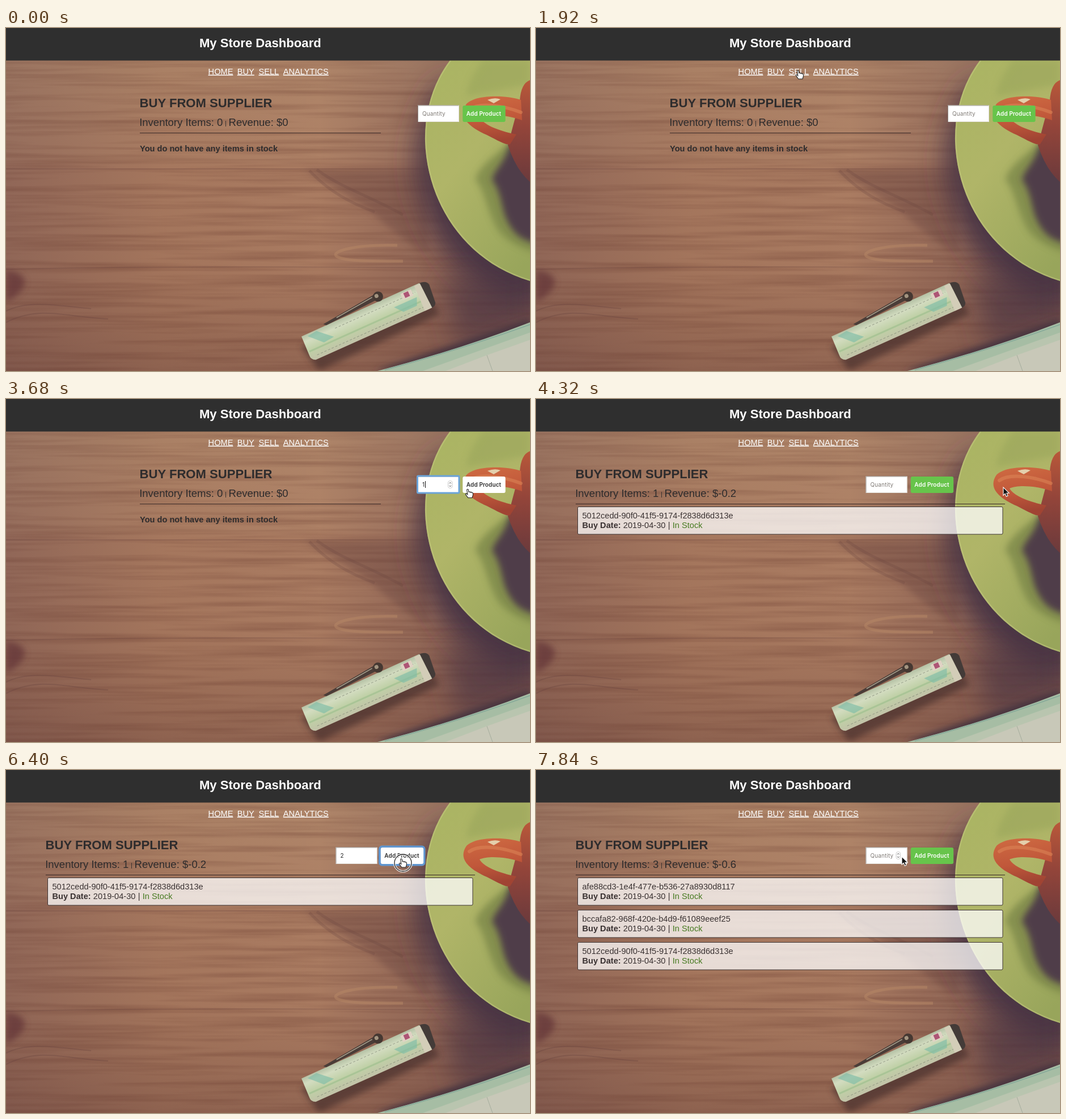
These frames come from a looping animation (924x606 px, 8000 ms). An HTML page:

```html
<!DOCTYPE html>
<html lang="en">
<head>
<meta charset="utf-8">
<title>My Store Dashboard</title>
<style>
  html, body { margin: 0; width: 100%; height: 100%; overflow: hidden; background: #93685a; }
  svg { position: absolute; left: 0; top: 0; width: 924px; height: 606px; }
  text { font: 14.6px "Liberation Sans", Arial, sans-serif; fill: #3a3232; white-space: pre; }
  .bold { font-weight: bold; }
  .title { font-size: 22.1px; fill: #fff; }
  .nav text { fill: #fff; text-decoration: underline; }
  .head text { fill: #2e2c2d; }
  .head .h2 { font-size: 22.1px; }
  .head .sum { font-size: 18.5px; }
  .head .bar { font-size: 11px; }
  .controls text { font: 10px Inter, sans-serif; letter-spacing: .12px; }
  .controls #label { font-weight: 600; }
</style>
</head>
<body>
<!-- Desk photo -->
<svg viewBox="0 0 924 606">
  <defs>
    <linearGradient id="wood">
      <stop offset="0" stop-color="#92695a"/><stop offset=".3" stop-color="#a87a60"/>
      <stop offset=".6" stop-color="#ae8065"/><stop offset="1" stop-color="#7a5550"/>
    </linearGradient>
    <linearGradient id="dusk" x2="0" y2="1">
      <stop offset="0" stop-color="#b39a78" stop-opacity=".3"/>
      <stop offset=".38" stop-color="#a98468" stop-opacity=".15"/>
      <stop offset=".41" stop-color="#80503e" stop-opacity=".08"/>
      <stop offset=".68" stop-color="#80503e" stop-opacity=".12"/>
      <stop offset="1" stop-color="#653d36" stop-opacity=".4"/>
    </linearGradient>
    <linearGradient id="lime" x2=".7" y2="1">
      <stop offset="0" stop-color="#a9b462"/><stop offset=".45" stop-color="#b0b568"/>
      <stop offset="1" stop-color="#98a55b"/>
    </linearGradient>
    <linearGradient id="red" x2=".2" y2="1">
      <stop offset="0" stop-color="#cf6b42"/><stop offset=".6" stop-color="#c0573a"/>
      <stop offset="1" stop-color="#a04433"/>
    </linearGradient>
    <linearGradient id="bowl" x2="0" y2="1">
      <stop offset="0" stop-color="#b9583a"/><stop offset=".45" stop-color="#94453a"/>
      <stop offset="1" stop-color="#6b3a3c"/>
    </linearGradient>
    <linearGradient id="mint" x2="0" y2="1">
      <stop offset="0" stop-color="#b3c0a4"/><stop offset=".25" stop-color="#d3dcc0"/>
      <stop offset=".6" stop-color="#bfd0a6"/><stop offset="1" stop-color="#c2c2a8"/>
    </linearGradient>
    <filter id="grain" x="0" y="0" width="1" height="1" color-interpolation-filters="sRGB">
      <feTurbulence type="fractalNoise" baseFrequency=".003 .1" numOctaves="3" seed="8"/>
      <feColorMatrix values="0 0 0 0 .38  0 0 0 0 .2  0 0 0 0 .16  2.4 0 0 0 -1"/>
    </filter>
    <filter id="soft" x="-50%" y="-50%" width="200%" height="200%"><feGaussianBlur stdDeviation="24"/></filter>
    <filter id="blur" x="-50%" y="-50%" width="200%" height="200%"><feGaussianBlur stdDeviation="6"/></filter>
    <path id="rim" d="M783 57C752 98 738 148 739 200C742 305 806 412 924 447"/>
    <path id="plate" d="M783 57C752 98 738 148 739 200C742 305 806 412 924 447H960V57Z"/>
    <clipPath id="inPlate"><use href="#plate"/></clipPath>
  </defs>
  <rect width="924" height="606" fill="url(#wood)"/>
  <rect width="924" height="606" fill="url(#dusk)"/>
  <rect width="924" height="606" filter="url(#grain)" opacity=".27"/>
  <path d="M525 250H745V400Q690 370 640 320Z" fill="#6b4540" opacity=".4" filter="url(#blur)"/>
  <g fill="none" stroke="#65403c">
    <path d="M0 249H740" stroke-opacity=".35" stroke-width="1.5"/>
    <path d="M0 426C250 421 500 421 800 424" stroke-opacity=".3" stroke-width="1.5"/>
    <path d="M535 252C570 290 610 310 650 325M548 250C590 282 640 296 700 330" stroke-opacity=".22" stroke-width="5"/>
    <path d="M690 384C610 382 570 396 584 404S640 412 700 412" stroke="#b88766" stroke-opacity=".5" stroke-width="5"/>
    <path d="M0 500C40 480 90 490 150 496M0 520C60 490 100 510 180 514" stroke-opacity=".3" stroke-width="2"/>
  </g>
  <path d="M0 428C44 432 44 462 0 484Z" fill="#633538" opacity=".75" filter="url(#blur)"/>
  <use href="#plate" transform="translate(-14 42)" fill="#4a3444" filter="url(#soft)"/>
  <path d="M770 440L924 430V520L800 565Z" fill="#4c3643" opacity=".65" filter="url(#soft)"/>

  <use href="#plate" fill="url(#lime)"/>
  <g clip-path="url(#inPlate)">
    <path d="M842 57Q815 90 812 120L924 100V57Z" fill="#9aa65c" opacity=".6" filter="url(#blur)"/>
    <path d="M888 203C862 225 832 246 828 268C846 290 846 320 868 358Q894 392 960 402V190Z" fill="#7f8a4c" opacity=".85" filter="url(#blur)"/>
    <path d="M888 206C880 238 860 252 857 268C876 294 872 320 886 345C900 370 914 378 960 386V190Z" fill="#4f3e49" filter="url(#blur)"/>
    <use href="#rim" fill="none" stroke="#c6ca80" stroke-width="5" stroke-opacity=".5"/>
  </g>
  <path d="M924 92Q908 98 906 128L885 207Q899 250 924 272Z" fill="url(#bowl)"/>
  <path d="M908 127C885 119 830 116 812 134C797 156 814 174 848 189C870 200 882 208 889 205L900 188C865 181 842 170 835 158C852 150 890 155 910 163Z" fill="url(#red)"/>
  <path d="M817 144C836 130 880 138 908 149" fill="none" stroke="#e08a5a" stroke-width="6" stroke-opacity=".5" stroke-linecap="round"/>
  <path d="M849 127Q862 122 872 126L860 133Z" fill="#e4d0ac"/>

  <path d="M520 562L752 486L766 505L552 606Z" fill="#4b302f" opacity=".75" filter="url(#blur)"/>
  <g transform="translate(521 545) rotate(-24.2)">
    <path d="M0 0L226 -1Q240 0 241 8L239 41Q236 49 226 48L6 48Q-2 44 -1 36Z" fill="url(#mint)"/>
    <path d="M2 30H226" stroke="#9cbf8c" stroke-width="3" stroke-opacity=".6"/>
    <path d="M12 41H226M60 11H215" stroke="#7f8775" stroke-dasharray="4 3" stroke-opacity=".7"/>
    <path d="M228 -1Q242 0 243 9L240 42Q238 48 230 48Z" fill="#433b38"/>
    <path d="M218 0H229L231 48H217Z" fill="#d3cdb8"/>
    <path d="M10 4L28 2L52 24L32 26ZM170 20H214L208 34H182Z" fill="#7fbda8" opacity=".65"/>
    <rect x="190" y="3" width="20" height="12" fill="#e0d2c4"/>
    <rect x="195" y="4" width="9" height="9" fill="#ad5575"/>
    <path d="M44 -4L146 -15L152 -5L48 0Z" fill="#4a3d38"/>
    <path d="M70 -5L142 -12" stroke="#aaa28e" stroke-width="1.5"/>
    <circle cx="152" cy="-9" r="9" fill="#453832"/><circle cx="150" cy="-11" r="3.5" fill="#a39480"/>
  </g>
  <path d="M650 606L924 514V606Z" fill="#473440" filter="url(#blur)"/>
  <path d="M655 606Q800 568 924 520V606Z" fill="#a6bda4"/>
  <path d="M735 606L924 538V606Z" fill="#b9c5af"/>
  <path d="M775 606L848 578L924 551V606Z" fill="#c8c8b8"/>
  <path d="M668 604Q805 567 924 524" fill="none" stroke="#8aac9b" stroke-width="2"/>
  <path d="M848 578L858 606" stroke="#a5ad9d"/>
</svg>

<!-- Page -->
<svg viewBox="0 0 924 606">
  <rect width="924" height="57.5" fill="#2f2f2f"/>
  <text class="title bold" x="340.9" y="34">My Store Dashboard</text>
  <g class="nav">
    <text x="356.6" y="81.6">HOME</text><text x="407.8" y="81.6">BUY</text>
    <text x="445.5" y="81.6">SELL</text><text x="488.8" y="81.6">ANALYTICS</text>
  </g>
  <g class="head" id="head">
    <text class="h2 bold" x="235.5" y="140.2">BUY FROM SUPPLIER</text>
    <text class="sum" x="235.2" y="173.2" id="count"></text>
    <text class="bar" x="386" y="172">|</text>
    <text class="sum" x="392.6" y="173.2" id="revenue"></text>
    <text class="bold" x="236" y="218.1" id="empty">You do not have any items in stock</text>
  </g>
  <path id="rule" stroke="#3a2a28"/>
  <g id="list"></g>
  <g class="controls" id="controls">
    <rect x="726" y="136.5" width="73" height="29.5" fill="#fff"/>
    <path d="M726.5 166V137H798.5" fill="none" stroke="#96918c"/>
    <path d="M727 165.5H798.5V137" fill="none" stroke="#e2dfda"/>
    <rect id="inputRing" x="725.5" y="136" width="73.5" height="30" rx="1.5" fill="none" stroke="#6ba4da" stroke-width="3"/>
    <text id="value" x="734" y="155.3"></text>
    <rect id="caret" y="145" width="1" height="12" fill="#111"/>
    <g id="spinner" fill="none" stroke="#555">
      <rect x="779.5" y="144.5" width="7.5" height="13" rx="3.5" fill="#fff" stroke="#ccc"/>
      <path d="M781.5 149.3L783.3 147.3L785 149.3M781.5 152.8L783.3 154.8L785 152.8"/>
    </g>
    <rect id="buttonRing" x="803.5" y="135.5" width="78.5" height="32" rx="4" fill="none" stroke="#6096d0" stroke-width="4"/>
    <rect id="button" x="805.3" y="137" width="75.4" height="29" rx="3"/>
    <text id="label" x="811.8" y="155.3">Add Product</text>
  </g>
  <g id="cursor">
    <g id="ring" fill="none"><circle cx="3" cy="7" r="15" stroke="#fff" stroke-width="4" stroke-opacity=".8"/><circle cx="3" cy="7" r="15" stroke="#222" stroke-width="1.3"/></g>
    <path id="arrow" d="M0 0V14.2L3.2 11.2L5.3 16.2L8 15L5.9 10.2H10.2Z" fill="#111" stroke="#fff" stroke-width="1.1"/>
    <path id="hand" d="M-1.3 1C-1.3 -.6 1.2 -.6 1.4 1L2 5.2C2.3 4 4.3 4 4.6 5.4C5.2 4.5 7 4.8 7.2 6C8.2 5.4 9.4 6 9.4 7.3V10.5L8 15H.8L-3.4 9.4C-4.3 8 -2.6 7 -1.5 8L-.2 9.2Z" fill="#fff" stroke="#222" stroke-width="1.1"/>
    <path id="beam" d="M-2.5 -7Q0 -7 0 -5Q0 -7 2.5 -7M0 -5V6M-2.5 8Q0 8 0 6Q0 8 2.5 8" fill="none" stroke="#222"/>
  </g>
</svg>
<script>
  const LOOP = 8000, STEP = 160;
  const $ = id => document.getElementById(id);
  const show = (id, on) => $(id).style.display = on ? "" : "none";
  const within = (t, a, b) => t >= a && t < b;

  // Pointer tip: time, x, y
  const path = [
    [320, 810, 541], [640, 560, 225], [960, 396, 84], [1120, 383, 72], [1280, 388, 74],
    [1600, 424, 75], [1920, 462, 75], [2240, 525, 76], [2400, 600, 98], [2720, 765, 166],
    [2880, 762, 152], [3360, 762, 152], [3680, 814, 159.5], [3840, 822, 157], [4160, 824, 156],
    [4800, 824, 156], [5120, 690, 152], [5280, 622, 152], [6080, 622, 152],
    [6400, 697, 157], [7360, 697, 157], [7840, 645, 153]
  ];
  const links = [[357, 401], [408, 438], [445, 481], [489, 569]];

  const ids = [
    "afe88cd3-1e4f-477e-b536-27a8930d8117",
    "bccafa82-968f-420e-b4d9-f61089eeef25",
    "5012cedd-90f0-41f5-9174-f2838d6d313e"
  ];
  $("list").innerHTML = ids.map(id => `<g>
    <rect x="73.5" y="190.5" width="749.5" height="48.5" rx="2" fill="#fff" fill-opacity=".75" stroke="#3d3434"/>
    <text x="81.5" y="211">${id}</text>
    <text class="bold" x="81.5" y="227.5">Buy Date:</text>
    <text x="153.8" y="227.5">2019-04-30</text><text x="232.8" y="227.5">|</text>
    <text x="240.8" y="227.5" style="fill:#467a20">In Stock</text></g>`).join("");
  const rows = [...$("list").children];

  function pointer(t) {
    const i = path.findIndex(p => p[0] > t);
    if (i < 0) return path[path.length - 1].slice(1);
    const [a, x, y] = path[i - 1] || path[0], [b, u, v] = path[i];
    const k = Math.max(0, (t - a) / (b - a));
    return [x + (u - x) * k, y + (v - y) * k];
  }

  function draw(t) {
    const stock = t < 4160 ? 0 : t < 6560 ? 1 : 3;
    const dx = stock ? -144.5 : 0;
    const typed = within(t, 3360, 4160) ? "1" : within(t, 6080, 6560) ? "2" : "";
    const focused = within(t, 3040, 3840) || within(t, 5440, 6400);
    const clicked = within(t, 3840, 4160) || within(t, 6400, 6560);

    const [x, y] = pointer(t);
    const inRow = y >= 137 && y < 166;
    const overInput = inRow && within(x - dx, 726, 799);
    const overButton = inRow && within(x - dx, 805, 881);
    const overLink = within(y, 70, 84) && links.some(([a, b]) => within(x, a, b));
    const kind = overButton || overLink ? "hand" : overInput && x - dx < 781 ? "beam" : "arrow";

    $("head").setAttribute("transform", `translate(${stock ? -166 : 0})`);
    $("rule").setAttribute("d", stock ? "M70 185.5H827" : "M236 185.5H661");
    $("count").textContent = "Inventory Items: " + stock;
    $("revenue").textContent = "Revenue: $" + (stock ? (-0.2 * stock).toFixed(1) : 0);
    show("empty", !stock);
    rows.forEach((row, i) => {
      const place = i - (3 - stock);
      row.style.display = place < 0 ? "none" : "";
      row.setAttribute("transform", `translate(0 ${place * 57})`);
    });

    $("controls").setAttribute("transform", `translate(${dx})`);
    $("value").textContent = typed || "Quantity";
    $("value").style.fill = typed ? "#222" : "#807b76";
    show("inputRing", focused);
    show("caret", focused && !within(t, 5760, 6080));
    $("caret").setAttribute("x", typed === "2" ? 740.5 : typed ? 739 : 733.5);
    show("spinner", focused || overInput);
    show("buttonRing", clicked);
    $("button").style.fill = overButton ? "#fff" : "#67c44b";
    $("label").style.fill = overButton ? "#2e2e2e" : "#fff";

    show("cursor", t >= 320);
    $("cursor").setAttribute("transform", `translate(${x} ${y})`);
    ["arrow", "hand", "beam"].forEach(k => show(k, k === kind));
    show("ring", clicked);
  }

  const start = performance.now();
  function tick() {
    const t = (performance.now() - start) % LOOP;
    draw(Math.floor(t / STEP) * STEP);
    requestAnimationFrame(tick);
  }
  tick();
</script>
</body>
</html>
```
